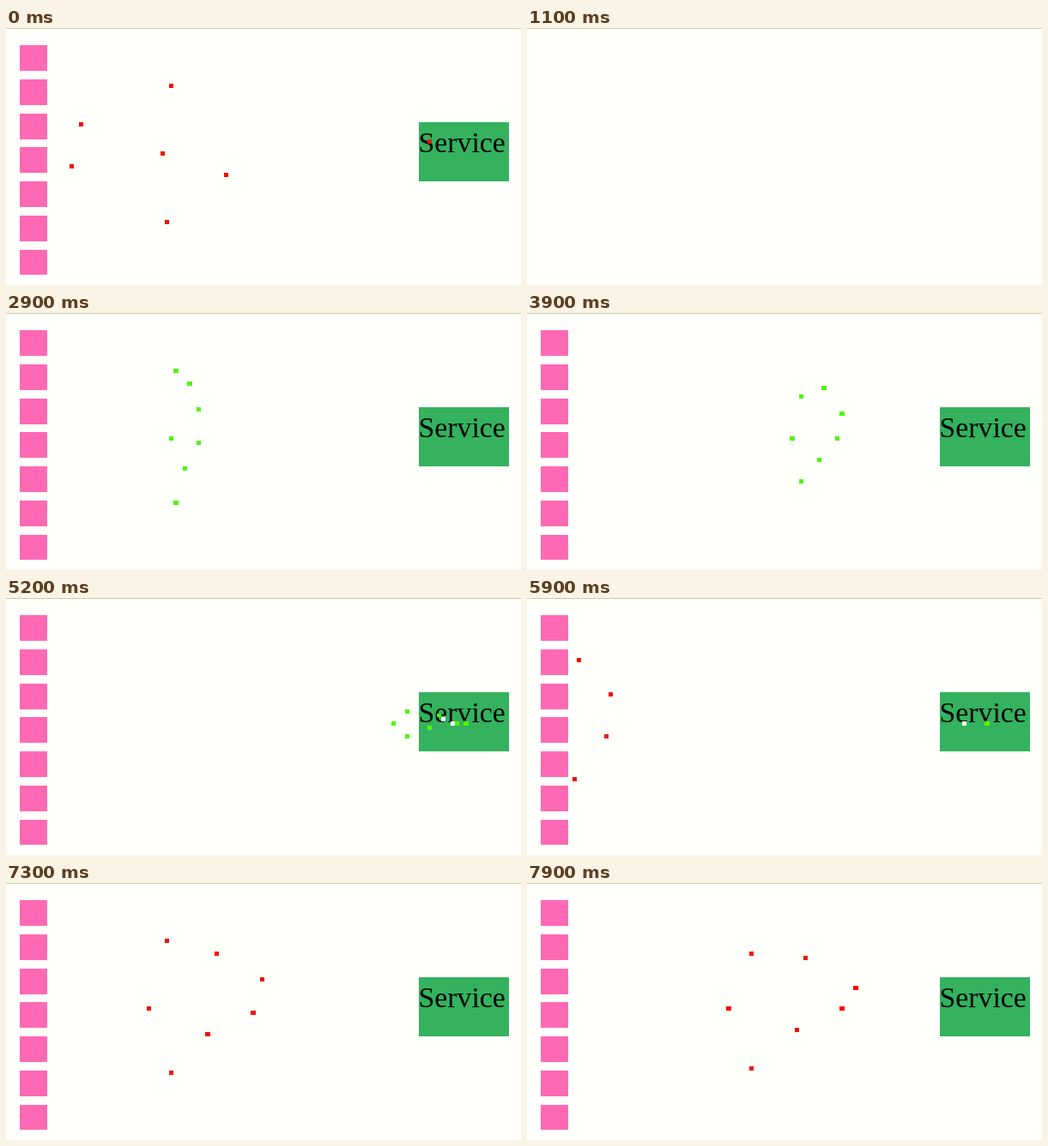
An HTML page with a canvas that plays this animation: 600 px wide and 300 px high, repeating every 8000 ms.

```html
<!DOCTYPE html>
<html lang="en">
<head>
<meta charset="utf-8">
<title>Clients and service</title>
<style>
  html, body { margin: 0; height: 100%; overflow: hidden; background: #fffffb; }
  canvas { display: block; }
</style>
</head>
<body>
<canvas id="stage" width="600" height="300"></canvas>
<script>
const ctx = document.getElementById('stage').getContext('2d');
const LOOP = 8000, STEP = 100;
const CELL_W = 5.28, CELL_H = 4.96, LEFT = 0.1, TOP = 0.6;
const PAPER = '#fffffb', PINK = '#ff69b4', SEA = '#34b25e', GREEN = '#50f500', RED = '#f21000';
const BLANK = 11, LAUNCH = 15.5;            // in steps
const ORIGIN = 6, LAP = 101;                // in columns
const VISIBLE_FROM = 8, VISIBLE_TO = 102, TURN = 98.5;

// speed: columns per step; start: opening column; rows: heights at the route's bends.
const BENDS = [15, 48, 68, 101], SERVICE_ROW = 29;
const clients = [
  { speed: 2.30, start: 36, rows: [8, 16, 21] },
  { speed: 2.50, start: 93, rows: [14, 16, 17] },
  { speed: 2.67, start: 16, rows: [22, 22, 23] },
  { speed: 2.23, start: 34, rows: [29, 29, 29] },
  { speed: 2.63, start: 14, rows: [32, 30, 29] },
  { speed: 2.46, start: 48, rows: [42, 34, 34] },
  { speed: 2.31, start: 35, rows: [47, 43, 36] }
];

function routeRow(rows, col) {
  const stops = [...rows, SERVICE_ROW];
  const x = Math.max(BENDS[0], Math.min(LAP, col));
  let i = 1;
  while (x > BENDS[i]) i++;
  const part = (x - BENDS[i - 1]) / (BENDS[i] - BENDS[i - 1]);
  return Math.round(stops[i - 1] + (stops[i] - stops[i - 1]) * part);
}

function cells(color, col, row, w, h) {
  const px = c => Math.round(c * CELL_W + LEFT), py = r => Math.round(r * CELL_H + TOP);
  ctx.fillStyle = color;
  ctx.fillRect(px(col), py(row), px(col + w) - px(col), py(row + h) - py(row));
}

function request({ speed, start, rows }, step) {
  const opening = step < BLANK;
  const travelled = opening ? start - ORIGIN + speed * step : speed * (step - LAUNCH);
  if (travelled < 0) return;
  const col = Math.round(ORIGIN + travelled % LAP);
  if (col < VISIBLE_FROM || col > VISIBLE_TO) return;
  const dot = (color, c) => cells(color, c, routeRow(rows, c), 1, 1);
  if (col > TURN) dot(PAPER, 2 * TURN - col); // the reply heads back
  dot(opening || travelled >= LAP ? RED : GREEN, col);
}

function draw(time) {
  const tick = Math.floor(time % LOOP / STEP);
  const step = tick < 40 ? tick : tick - 1; // one step of stall
  ctx.fillStyle = PAPER;
  ctx.fillRect(0, 0, 600, 300);
  ctx.fillStyle = '#cccc99';
  ctx.fillRect(0, 0, 600, 1);
  if (tick === BLANK) return;

  clients.forEach((_, i) => cells(PINK, 3, 4 + 8 * i, 6, 6));
  cells(SEA, 91, 22, 20, 14);
  ctx.fillStyle = '#000';
  ctx.font = '33.8px "Liberation Serif", serif';
  ctx.fillText('Service', 480.5, 145);
  clients.forEach(client => request(client, step));
}

function frame() {
  draw(performance.now());
  requestAnimationFrame(frame);
}
frame();
</script>
</body>
</html>
```
